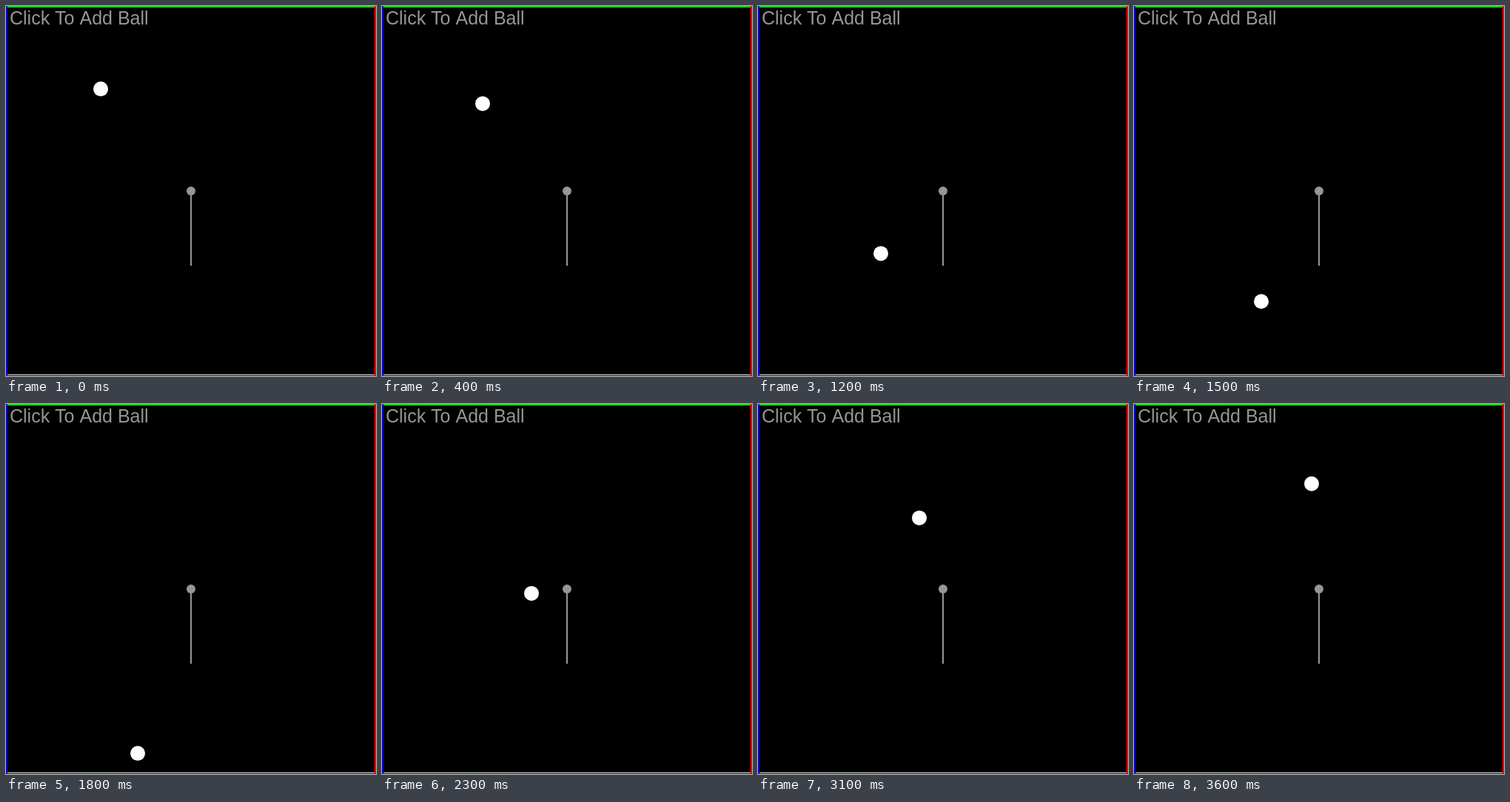
These frames come from a looping animation (500 by 500 pixels, 3.7 s). An HTML page with a canvas:

```html
<!DOCTYPE html>
<html>
<head>
<meta charset="utf-8">
<style>
html, body { margin: 0; width: 100%; height: 100%; overflow: hidden; background: #000; }
canvas { display: block; }
</style>
</head>
<body>
<canvas id="stage" width="500" height="500"></canvas>
<script>
const ctx = document.getElementById('stage').getContext('2d');
const GRAY = '#969696', GRAVITY = 0.9, FLOOR_STEP = 26;

function rect(color, x, y, w, h) {
  ctx.fillStyle = color;
  ctx.fillRect(x, y, w, h);
}

function disc(color, x, y, r) {
  ctx.fillStyle = color;
  ctx.beginPath();
  ctx.arc(x, y, r, 0, 2 * Math.PI);
  ctx.fill();
}

// The simulation skips ahead three times per loop.
function stepAt(tick) {
  return tick + (tick >= 10) * 7 + (tick >= 22) * 7 + (tick >= 34) * 6;
}

function ballY(step) {
  if (step < FLOOR_STEP) {
    const fall = step + 3;
    return 106.7 + GRAVITY / 2 * fall * (fall + 1);
  }
  const rise = step - FLOOR_STEP;
  return 490.2 - 25.8 * rise + GRAVITY / 2 * rise * (rise - 1);
}

function draw(ms) {
  const step = stepAt(Math.floor(ms % 3700 / 100));
  rect('#000', 0, 0, 500, 500);
  disc('#fff', 128 + 2 * step, ballY(step), 10);

  rect('#000', 0, 498, 500, 2);
  rect('#fff', 0, 498, 500, 1);
  rect('#0f0', 0, 0, 500, 2);
  rect('#00f', 0, 0, 2, 500);
  rect('#f00', 498, 0, 2, 500);

  rect(GRAY, 249, 250, 2, 101);
  disc(GRAY, 250, 250, 6);
  ctx.font = '25px "Liberation Sans", Arial, sans-serif';
  ctx.fillText('Click To Add Ball', 5, 25);
}

const start = performance.now();
function loop() {
  draw(performance.now() - start);
  requestAnimationFrame(loop);
}
loop();
</script>
</body>
</html>
```
